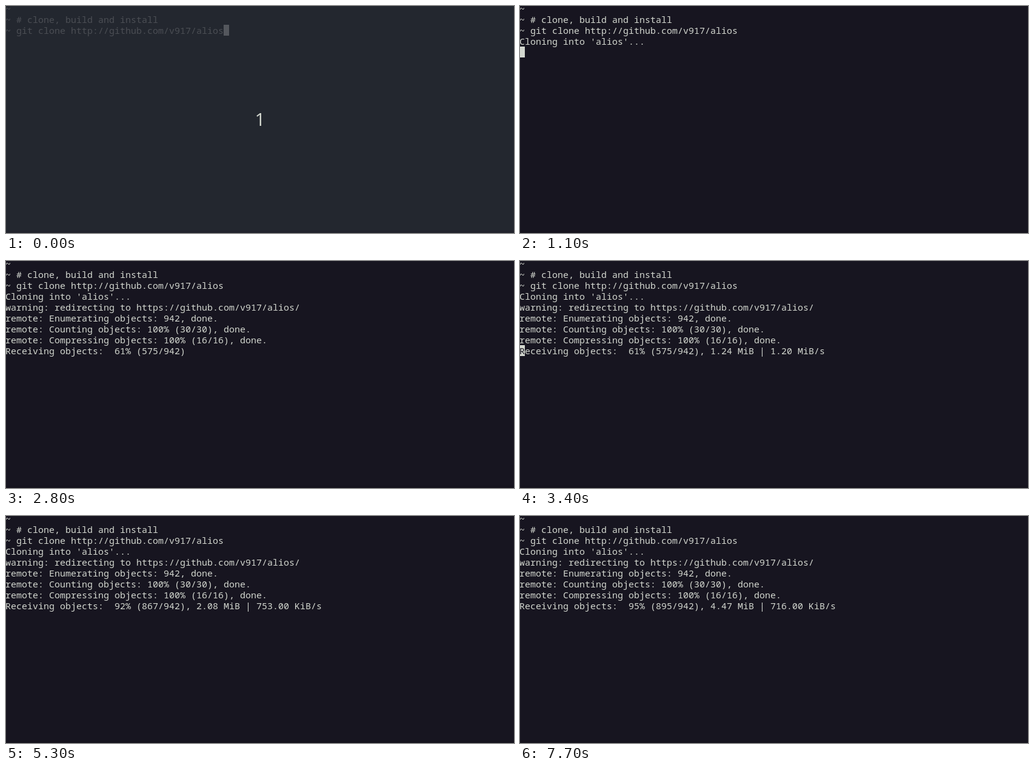
An HTML page with a canvas that plays this animation: 838 by 375 pixels, repeating every 8 s.

```html
<!DOCTYPE html>
<html lang="en">
<head>
<meta charset="utf-8">
<title>Terminal</title>
<style>
  html, body { margin: 0; width: 100%; height: 100%; overflow: hidden; background: #171520; }
  canvas { display: block; }
</style>
</head>
<body>
<canvas id="term" width="838" height="375"></canvas>
<script>
const ctx = document.getElementById('term').getContext('2d');
const LOOP = 8000;
const CELL = { w: 9, h: 18, x: -1, y: -5, base: 15 };
const LIVE = { bg: '#171520', edge: '#15131d', ink: '#d3d7cf', block: '#d3d7cf' };
const DIM = { bg: '#23272f', edge: '#21232c', ink: '#4b4e54', block: '#54575d' };

const PROMPT = [
  '~',
  '~ # clone, build and install',
  '~ git clone http://github.com/v917/alios'
];

// Log lines and the time each one appears
const LOG = [
  [1100, "Cloning into 'alios'..."],
  [1600, 'warning: redirecting to https://github.com/v917/alios/'],
  [1900, 'remote: Enumerating objects: 942, done.'],
  [1900, 'remote: Counting objects: 100% (30/30), done.'],
  [1900, 'remote: Compressing objects: 100% (16/16), done.']
];

// Time, objects received, transfer info
const PROGRESS = [
  [1900, 189, ''],
  [2000, 575, ''],
  [2900, 575, '1.24 MiB | 1.20 MiB/s'],
  [4100, 575, '1.64 MiB | 797.00 KiB/s'],
  [5000, 641, '2.08 MiB | 753.00 KiB/s'],
  [5100, 745, '2.08 MiB | 753.00 KiB/s'],
  [5200, 829, '2.08 MiB | 753.00 KiB/s'],
  [5300, 867, '2.08 MiB | 753.00 KiB/s'],
  [6000, 869, '2.88 MiB | 712.00 KiB/s'],
  [7100, 886, '3.68 MiB | 714.00 KiB/s'],
  [7700, 895, '4.47 MiB | 716.00 KiB/s']
];

// The cursor starts visible and flips at each of these times
const BLINKS = [500, 1000, 1700, 2200, 2800, 3400, 4000, 4600, 5200, 5900, 6400, 7000, 7700];

function progressLine([, count, info]) {
  const pct = String(Math.floor(count / 942 * 100)).padStart(3);
  return `Receiving objects: ${pct}% (${count}/942)${info && ', ' + info}`;
}

function screenAt(t) {
  const lines = PROMPT.concat(LOG.filter(([at]) => t >= at).map(([, text]) => text));
  const step = PROGRESS.filter(([at]) => t >= at).pop();
  let cursor = { col: 0, row: lines.length };
  if (t < LOG[0][0]) cursor = { col: lines[2].length, row: 2 };
  if (step) lines.push(progressLine(step));
  const on = BLINKS.filter(at => t >= at).length % 2 === 0;
  return { lines, cursor, on };
}

function drawText(text, col, row, color) {
  ctx.fillStyle = color;
  ctx.fillText(text, CELL.x + col * CELL.w, CELL.y + row * CELL.h + CELL.base);
}

function draw(t) {
  const countdown = t < 100;
  const c = countdown ? DIM : LIVE;
  const { lines, cursor, on } = screenAt(t);

  ctx.fillStyle = c.bg;
  ctx.fillRect(0, 0, 838, 375);
  ctx.fillStyle = c.edge;
  ctx.fillRect(0, 371, 838, 4);

  ctx.font = '15px "Noto Sans Mono", "DejaVu Sans Mono", monospace';
  ctx.textAlign = 'left';
  lines.forEach((line, row) => drawText(line, 0, row, c.ink));

  if (on) {
    ctx.fillStyle = c.block;
    ctx.fillRect(CELL.x + cursor.col * CELL.w, CELL.y + cursor.row * CELL.h, CELL.w, CELL.h);
    const under = (lines[cursor.row] || '')[cursor.col];
    if (under) drawText(under, cursor.col, cursor.row, c.bg);
  }

  if (countdown) {
    ctx.font = '30px "Open Sans", "Noto Sans", sans-serif';
    ctx.textAlign = 'center';
    ctx.fillStyle = '#d3d7cf';
    ctx.fillText('1', 419, 198);
  }
}

const start = performance.now();
function tick() {
  draw((performance.now() - start) % LOOP);
  requestAnimationFrame(tick);
}
tick();
</script>
</body>
</html>
```
